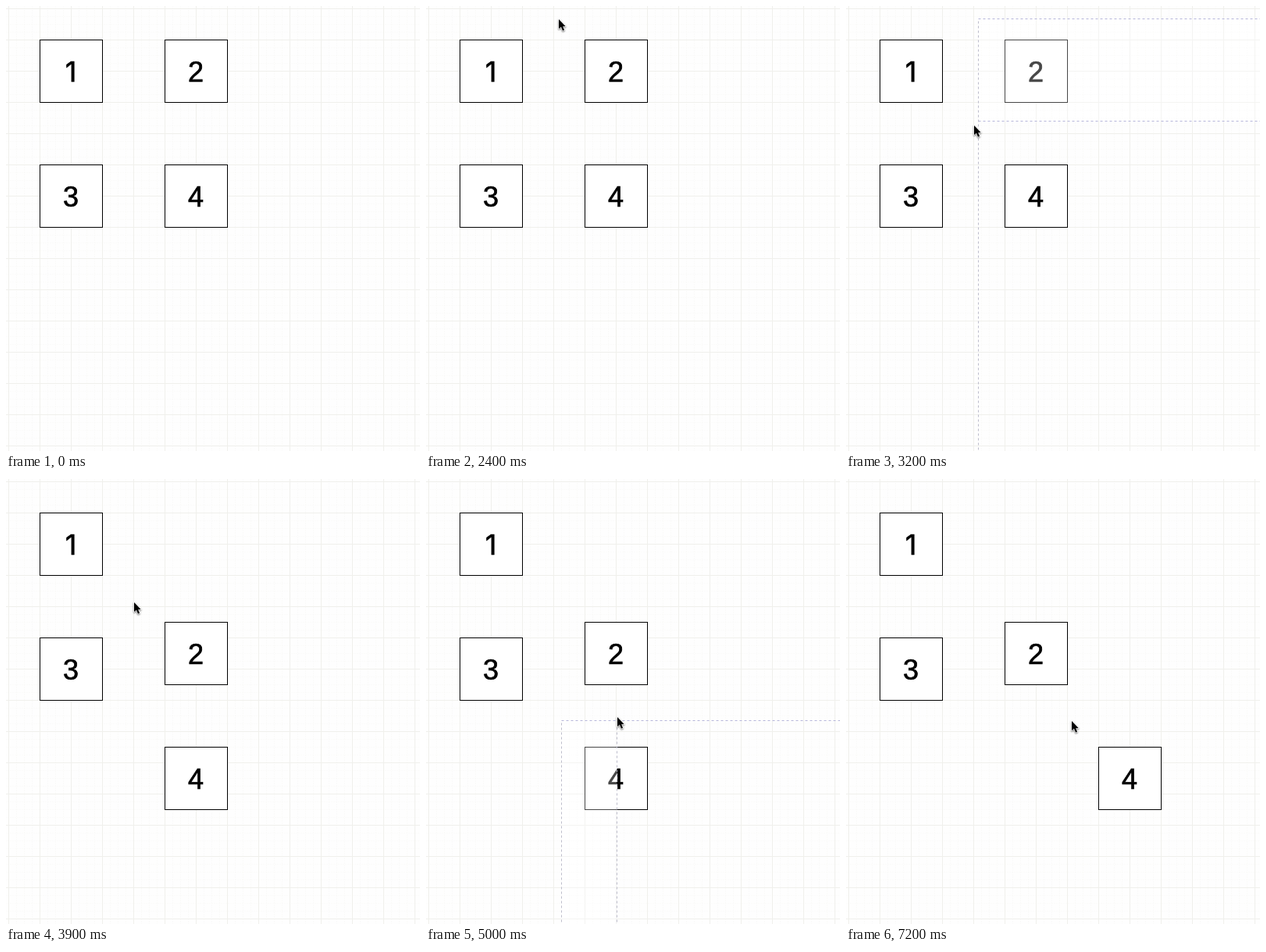
Write an HTML page with a canvas that moves like this. It is 530 px wide and 570 px high and loops after 7400 ms.

```html
<!DOCTYPE html>
<html>
<head>
<meta charset="utf-8">
<style>
html, body { margin: 0; width: 100%; height: 100%; overflow: hidden; background: #fefefe; }
canvas { display: block; }
</style>
</head>
<body>
<canvas id="stage" width="530" height="570"></canvas>
<script>
const W = 530, H = 570, LOOP = 7400, TICK = 100;
const c = document.getElementById('stage').getContext('2d');

// Pointer moves: when, and where to; it rests in between
const moves = [
  { from: 1000, to: 1400, x: 283, y: 108 },
  { from: 1400, to: 1700, x: 172, y: 20 },
  { from: 1700, to: 2000, x: 169, y: 16 },
  { from: 2500, to: 3200, x: 163, y: 152, power: 3 },
  { from: 3200, to: 3600, x: 163, y: 157 },
  { from: 3900, to: 4600, x: 173, y: 308 },
  { from: 4800, to: 5000, x: 244, y: 304 },
  { from: 5000, to: 5500, x: 288, y: 309 }
];

function pointerAt(t) {
  let x = 522, y = 300;
  for (const m of moves) {
    const p = Math.min(1, Math.max(0, (t - m.from) / (m.to - m.from))) ** (m.power || 1);
    x += (m.x - x) * p;
    y += (m.y - y) * p;
  }
  return [Math.round(x), Math.round(y)];
}

function line(x1, y1, x2, y2, color, dash = [], offset = 0) {
  c.strokeStyle = color;
  c.lineWidth = 1;
  c.setLineDash(dash);
  c.lineDashOffset = offset;
  c.beginPath();
  c.moveTo(x1 + .5, y1 + .5);
  c.lineTo(x2 + .5, y2 + .5);
  c.stroke();
  c.setLineDash([]);
}

function grid(step, color, dash) {
  for (let p = 3; p < H; p += step) {
    line(p, -1, p, H, color, dash);
    line(-1, p, W, p, color, dash);
  }
}

function box(label, x, y) {
  c.fillStyle = '#fff';
  c.fillRect(x, y, 81, 81);
  c.strokeStyle = c.fillStyle = '#000';
  c.lineWidth = 1;
  c.strokeRect(x + .5, y + .5, 80, 80);
  // Inter has a "1" without a foot
  c.font = label === '1' ? '35px Inter, sans-serif' : '36px "Liberation Sans", Arial, sans-serif';
  c.textAlign = 'center';
  c.lineWidth = .7;
  c.fillText(label, x + 40, y + 54);
  c.strokeText(label, x + 40, y + 54);
}

function dim(x, y, w, h) {
  c.fillStyle = 'rgba(255,255,255,.28)';
  c.fillRect(x, y, w, h);
}

const across = (x, y) => line(x, y, W, y, '#b6b6da', [3, 3]);
const down = (x, y) => line(x, y, x, H, '#bcbccb', [3, 3], 3);

function inkShape(points) {
  c.beginPath();
  for (const [x, y] of points) c.lineTo(x, y);
  c.closePath();
  c.lineJoin = 'round';
  c.strokeStyle = '#fff';
  c.lineWidth = 2;
  c.stroke();
  c.fillStyle = '#000';
  c.fill();
}

function arrow(x, y) {
  c.save();
  c.translate(x, y);
  c.shadowColor = 'rgba(0,0,0,.4)';
  c.shadowBlur = 2;
  c.shadowOffsetY = 1;
  inkShape([[1, 1], [1, 13], [4, 10.5], [6, 15.5], [8, 14.7], [6, 10], [9.6, 10]]);
  c.restore();
}

function moveCross(x, y) {
  const arm = [[-1, -1], [-1, -4], [-3.4, -4], [0, -7.6], [3.4, -4], [1, -4]];
  const points = [];
  for (let turn = 0; turn < 4; turn++) {
    const a = turn * Math.PI / 2, co = Math.cos(a), si = Math.sin(a);
    for (const [px, py] of arm) points.push([px * co - py * si, px * si + py * co]);
  }
  c.save();
  c.translate(x + .5, y);
  inkShape(points);
  c.restore();
}

function draw(t) {
  c.fillStyle = '#fefefe';
  c.fillRect(0, 0, W, H);
  grid(10, '#f7f7f5', [1, 2]);
  grid(40, '#f0f0ec');

  const dy = t >= 3900 ? 140 : 0, dx = t >= 5700 ? 120 : 0;
  const boxes = [
    ['1', 43, 43], ['2', 203, 43 + dy],
    ['3', 43, 203], ['4', 203 + dx, 203 + dy]
  ];
  for (const b of boxes) box(...b);

  const [x, y] = pointerAt(t);
  if (t >= 2500 && t < 3900) {
    const edge = pointerAt(t - 9)[1]; // trails the pointer slightly
    dim(169, 16, W, edge - 16);
    across(169, 16);
    across(169, edge);
    down(169, 16);
  }
  if (t >= 4900 && t < 5700) {
    dim(173, 309, x - 173, H);
    across(173, 309);
    down(173, 309);
    down(x, 309);
  }

  if (t >= 1000) {
    const over = boxes.some(([, bx, by]) => x >= bx && x <= bx + 80 && y >= by && y <= by + 80);
    (over ? moveCross : arrow)(x, y);
  }
}

function frame() {
  draw(Math.floor(performance.now() % LOOP / TICK) * TICK);
  requestAnimationFrame(frame);
}
frame();
</script>
</body>
</html>
```
